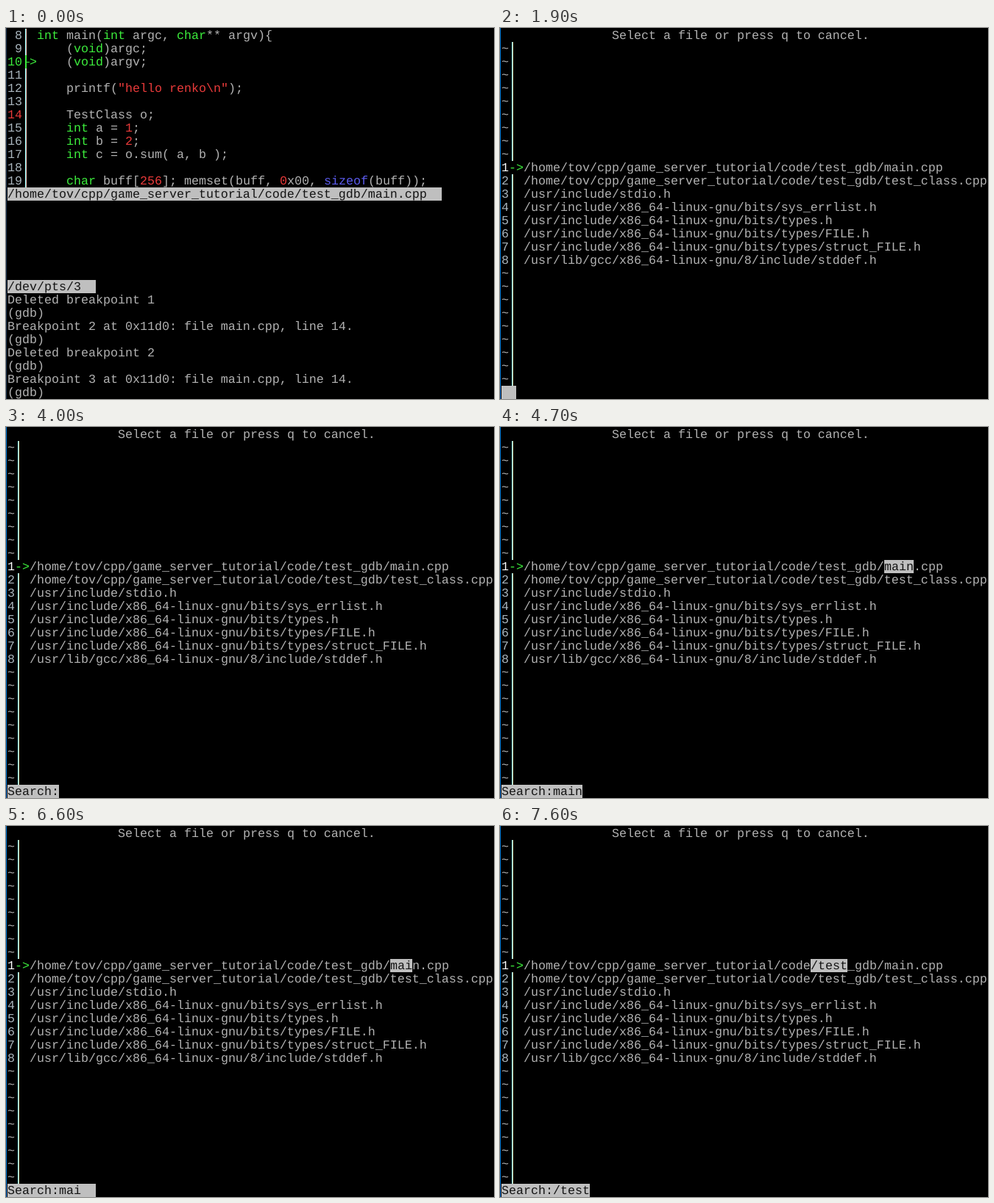
Write an HTML page that moves like this. It is 663 px wide and 505 px high and loops after 8000 ms.

```html
<!DOCTYPE html>
<html lang="en">
<head>
<meta charset="utf-8">
<title>Debugger file dialog</title>
<style>
  html, body { margin: 0; width: 100%; height: 100%; overflow: hidden; background: #000; }
  svg { display: block; }
  text {
    font: 16.663px "Liberation Mono", "Courier New", monospace;
    white-space: pre;
    text-rendering: geometricPrecision;
  }
</style>
</head>
<body>
<svg id="term" width="663" height="505" viewBox="0 0 663 505"></svg>
<script>
const LOOP = 8000, CW = 10, RH = 18, LEFT = 2, TOP = 1;
const PANEL = '#bfbfbf', GREY = '#b2b2b2', NUMBER = '#a8b4bc', GREEN = '#3cec3c',
      RED = '#e83a3a', BLUE = '#5c5cf0', WHITE = '#fff', INK = '#141414';
// left and right colour fringe of the divider lines
const CODE_BAR = ['#8cffff', '#ffc8c0'], LIST_BAR = ['#8cffff', '#dcdc9c'],
      ARROW_BAR = [GREEN, GREEN];
const term = document.getElementById('term');

const dir = '/home/tov/cpp/game_server_tutorial/code/test_gdb/';
const gnu = '/usr/include/x86_64-linux-gnu/bits/';
const files = [
  dir + 'main.cpp', dir + 'test_class.cpp', '/usr/include/stdio.h',
  gnu + 'sys_errlist.h', gnu + 'types.h', gnu + 'types/FILE.h',
  gnu + 'types/struct_FILE.h', '/usr/lib/gcc/x86_64-linux-gnu/8/include/stddef.h'
];
const code = [
  'int main(int argc, char** argv){',
  '    (void)argc;',
  '    (void)argv;',
  '',
  '    printf("hello renko\\n");',
  '',
  '    TestClass o;',
  '    int a = 1;',
  '    int b = 2;',
  '    int c = o.sum( a, b );',
  '',
  '    char buff[256]; memset(buff, 0x00, sizeof(buff));'
];
const gdb = [
  'Deleted breakpoint 1', '(gdb)',
  'Breakpoint 2 at 0x11d0: file main.cpp, line 14.', '(gdb)',
  'Deleted breakpoint 2', '(gdb)',
  'Breakpoint 3 at 0x11d0: file main.cpp, line 14.', '(gdb)'
];

// start time, selected file, search text (null = no search), status bar columns
const steps = [
  [1900, 0, null, 2], [2800, 1, null, 2], [3300, 2, null, 2],
  [3600, 1, null, 2], [3700, 0, null, 2],
  [4000, 0, '', 7], [4300, 0, 'm', 8], [4400, 0, 'ma', 9],
  [4500, 0, 'mai', 10], [4700, 0, 'main', 11], [5600, 0, 'main/', 12],
  [6100, 0, 'main', 12], [6600, 0, 'mai', 12], [6700, 0, 'm', 12],
  [7100, 0, '/', 12], [7300, 0, '/t', 12], [7500, 0, '/te', 12],
  [7600, 0, '/test', 12]
];

const esc = s => s.replace(/&/g, '&amp;').replace(/</g, '&lt;').replace(/>/g, '&gt;');
const colX = c => LEFT + c * CW;
const rowY = r => TOP + r * RH;
const rect = (x, y, w, h, fill) =>
  `<rect x="${x}" y="${y}" width="${w}" height="${h}" fill="${fill}"/>`;
const put = (row, col, s, fill = GREY) =>
  `<text x="${colX(col)}" y="${rowY(row) + 14}" fill="${fill}">${esc(s)}</text>`;
const inverse = (row, col, s, cols = s.length) =>
  rect(colX(col), rowY(row), cols * CW, RH, PANEL) + put(row, col, s, INK);
const bar = (row, col, [left, right]) =>
  rect(colX(col) + 4, rowY(row), 1, RH, left) +
  rect(colX(col) + 5, rowY(row), 1, RH, right);
const edge = fill => rect(0, 0, 1, 505, fill);

function tokenColor(s) {
  if (/^(int|char|void)$/.test(s)) return GREEN;
  if (s === 'sizeof') return BLUE;
  return /^["\d]/.test(s) ? RED : GREY;
}

function codeLine(row, line) {
  let out = '';
  for (const m of line.matchAll(/"[^"]*"|\d+|[A-Za-z_]\w*|[^\s\w"]+/g))
    out += put(row, 4 + m.index, m[0], tokenColor(m[0]));
  return out;
}

function drawDebugger(focused) {
  let out = edge(focused ? '#0078d7' : '#1b3350');
  code.forEach((line, r) => {
    const n = r + 8, here = n === 10;
    out += put(r, 0, String(n).padStart(2), here ? GREEN : n === 14 ? RED : NUMBER);
    out += bar(r, 2, here ? ARROW_BAR : CODE_BAR);
    if (here) out += rect(colX(2) + 6, rowY(r) + 9, 4, 1, GREEN) + put(r, 3, '>', GREEN);
    out += codeLine(r, line);
  });
  out += inverse(12, 0, files[0], files[0].length + 2);
  out += inverse(19, 0, '/dev/pts/3', 12);
  gdb.forEach((s, i) => out += put(20 + i, 0, s));
  return out;
}

function drawPicker([, sel, query, cols]) {
  let out = edge('#0078d7') + put(0, 15, 'Select a file or press q to cancel.');
  for (let r = 1; r <= 26; r++) {
    const i = r - 10, name = files[i];
    if (i !== sel) out += bar(r, 1, LIST_BAR);
    if (!name) { out += put(r, 0, '~'); continue; }
    out += put(r, 0, String(i + 1), i === sel ? WHITE : NUMBER);
    if (i === sel) out += put(r, 1, '->', GREEN);
    const at = i === sel && query ? name.indexOf(query) : -1;
    if (at < 0) { out += put(r, 3, name); continue; }
    const end = at + query.length;
    out += put(r, 3, name.slice(0, at)) + inverse(r, 3 + at, query) +
           put(r, 3 + end, name.slice(end));
  }
  return out + inverse(27, 0, query === null ? '' : 'Search:' + query, cols);
}

let shown = null;
function render(t) {
  const step = steps.filter(s => s[0] <= t).pop();
  const key = step ? step[0] : t >= 400 ? 400 : 0;
  if (key === shown) return;
  shown = key;
  term.innerHTML = step ? drawPicker(step) : drawDebugger(key > 0);
}

const start = performance.now();
function tick() {
  render((performance.now() - start) % LOOP);
  requestAnimationFrame(tick);
}
tick();
</script>
</body>
</html>
```
